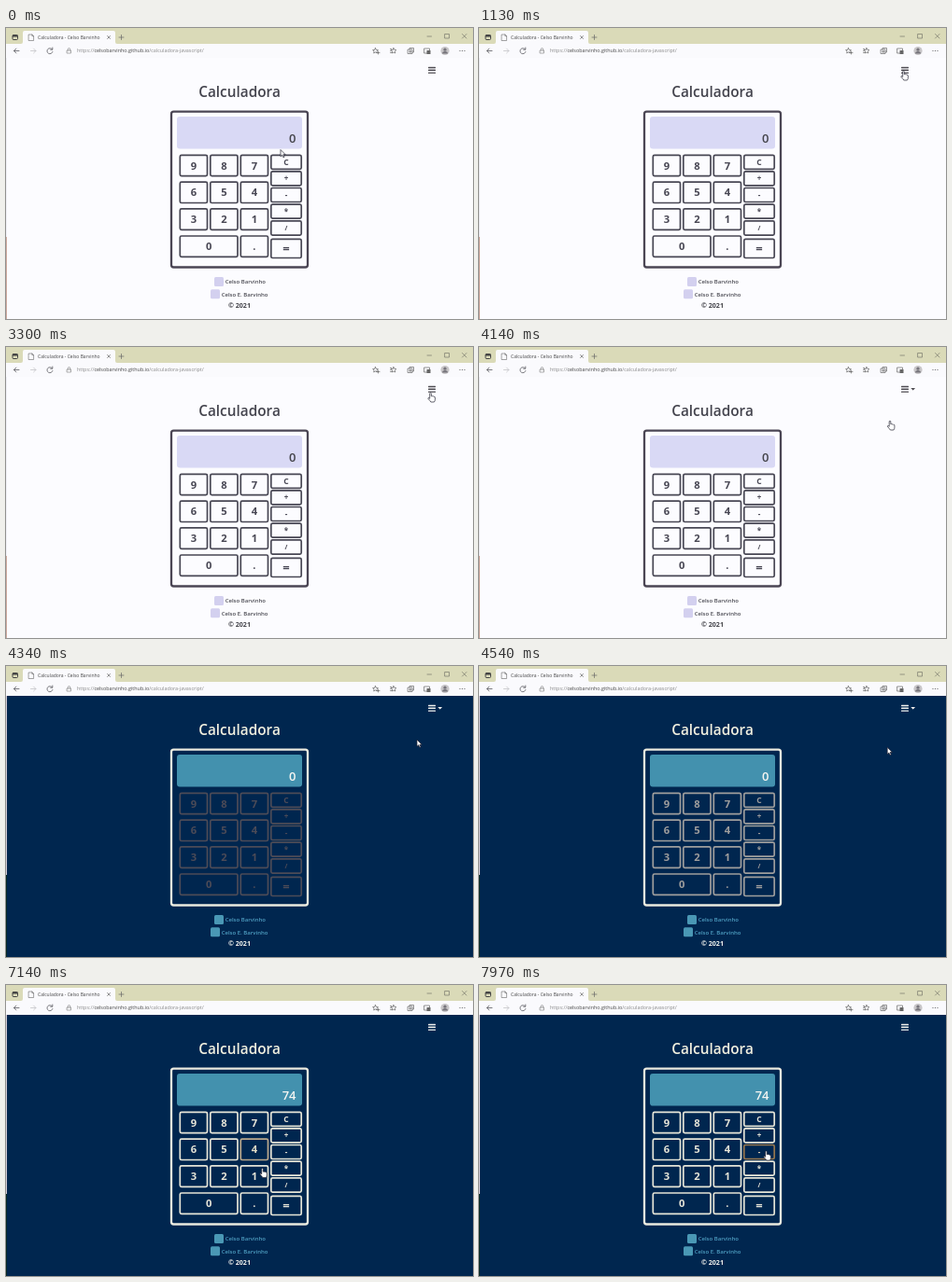
Recreate the animation shown at these times as an HTML page. Size 500 px wide and 312 px high, loop 8000 ms.

```html
<!DOCTYPE html>
<html lang="pt">
<head>
<meta charset="utf-8">
<title>Calculadora</title>
<style>
  html, body { margin: 0; width: 100%; height: 100%; overflow: hidden; }
  svg { display: block; width: 500px; height: 312px; }
  text { font-family: "Open Sans", "Noto Sans", sans-serif; }
</style>
</head>
<body>
<svg id="stage" viewBox="0 0 500 312" xmlns="http://www.w3.org/2000/svg"></svg>
<script>
const LOOP = 8000, THEME_AT = 4250;
const stage = document.getElementById('stage');

function add(tag, attrs, content) {
  const el = document.createElementNS(stage.namespaceURI, tag);
  for (const name in attrs) el.setAttribute(name, attrs[name]);
  if (content) el.textContent = content;
  return stage.appendChild(el);
}
const rect = (x, y, width, height, attrs) => add('rect', { x, y, width, height, ...attrs });
const label = (x, y, size, content, attrs) => add('text', { x, y, 'font-size': size, ...attrs }, content);
const line = (d, stroke = '#5c5c62', width = 0.8) =>
  add('path', { d, stroke, 'stroke-width': width, fill: 'none', 'stroke-linecap': 'round', 'stroke-linejoin': 'round' });

const clamp = v => Math.min(1, Math.max(0, v));
const ease = v => { v = clamp(v); return v * v * (3 - 2 * v); };
const mix = (a, b, p) => `rgb(${a.map((v, i) => Math.round(v + (b[i] - v) * p))})`;

// Elements whose colour depends on the theme
const themed = [];
function theme(el, light, dark, prop = 'fill') {
  themed.push({ el, prop, colors: [light, dark] });
  return el;
}

function drawBrowser() {
  rect(0, 0, 500, 18, { fill: '#dadab8' });
  add('path', { d: 'M16 17q2 0 2-2V5q0-2 2-2h95q2 0 2 2v10q0 2 2 2z', fill: '#fafafd' });
  rect(0, 17, 500, 16, { fill: '#fafafd' });
  rect(7, 7.5, 5.5, 5, { rx: 1, fill: 'none', stroke: '#444' });
  rect(7, 7.5, 5.5, 2, { fill: '#444' });
  line('M24.5 7h3.4l1.7 1.7v4.8h-5.1zM27.9 7v1.7h1.7', '#666', 0.6);
  label(34, 12, 5, 'Calculadora - Celso Barvinho', { fill: '#444' });
  line('M108.5 8.5l3 3m0-3l-3 3M121 10h5m-2.5-2.5v5', '#666', 0.7);
  line('M451 9h4.5M470 6.5h4.5v4.5h-4.5zM488.5 6.5l4.5 4.5m0-4.5l-4.5 4.5', '#77776a', 0.7);

  line('M14 24.5h-5.5m2.4-2.4l-2.4 2.4l2.4 2.4');
  line('M26.5 24.5h5.5m-2.4-2.4l2.4 2.4l-2.4 2.4', '#c4c4c8');
  line('M49.5 23a3 3 0 1 0 .4 2.5M49.8 21v2.2h-2.2');
  line('M65.5 24h4v3h-4zM66.3 24v-1.2a1.2 1.2 0 0 1 2.4 0v1.2', '#777', 0.6);
  const url = label(76, 26.3, 5.4, '', {});
  [['https://', '#888'], ['celsobarvinho.github.io', '#444'], ['/calculadora-javascript/', '#888']]
    .forEach(([part, fill]) => url.appendChild(add('tspan', { fill }, part)));

  const star = x => line(`M${x} 21.5l.9 1.9l2 .2l-1.5 1.4l.4 2l-1.8-1l-1.8 1l.4-2l-1.5-1.4l2-.2z`, '#666', 0.7);
  star(395.5);
  line('M397 26.500h3m-1.5-1.5v3', '#666', 0.7);
  star(415);
  line('M411.5 22.5h1.3m-1.3 2h.9m-.9 2h1.3', '#666', 0.7);
  line('M430.5 23h4.5v4.5h-4.5zM432 23v-1.5h4.500v4.5h-1.5M432.8 24v2.5m-1.2-1.2h2.5', '#666', 0.7);
  line('M448 22h5.5v5h-5.5z', '#666', 0.7);
  rect(450.5, 24, 4, 4, { fill: '#666' });
  add('circle', { cx: 470, cy: 24.5, r: 4.6, fill: '#c8c6c8' });
  add('circle', { cx: 470, cy: 23.2, r: 1.6, fill: '#77757c' });
  add('path', { d: 'M467 27.5a3 2.6 0 0 1 6 0z', fill: '#77757c' });
  for (const x of [486, 488.5, 491]) add('circle', { cx: x, cy: 24.5, r: 0.6, fill: '#555' });
}

const keys = {};
function addKey(name, x, y, w, h, size) {
  const box = rect(x, y, w, h, { rx: 1.6, fill: 'none', 'stroke-width': 1.7 });
  const text = label(x + w / 2, y + h / 2 + size * 0.36, size, name,
    { 'text-anchor': 'middle', 'font-weight': 700 });
  keys[name] = { box, text };
}

let caret, display;
function drawPage() {
  theme(rect(0, 32, 500, 280), '#fcfcff', '#00264f');
  theme(rect(0, 32, 1, 192), '#eeeef4', '#d5cdd6');
  theme(rect(0, 224, 1, 88), '#cba69c', '#0a2a24');

  for (let i = 0; i < 3; i++) theme(rect(452, 41.8 + i * 2.8, 8, 1.4, { rx: 0.4 }), '#4c4a50', '#f0f0ee');
  caret = theme(add('path', { d: 'M462.3 44h4.8l-2.4 2.6z' }), '#4c4a50', '#f0f0ee');

  const centered = { 'text-anchor': 'middle' };
  theme(label(250, 74, 15.35, 'Calculadora', { ...centered, 'font-weight': 600 }), '#44444e', '#f0efdf');
  theme(rect(177, 89.7, 146, 166.8, { rx: 2.5, fill: 'none', 'stroke-width': 2.3 }), '#4b4654', '#ebeadf', 'stroke');
  theme(rect(183, 95, 134, 34.5, { rx: 3 }), '#d9d9f5', '#4391ae');
  display = theme(label(310.5, 123, 13, '0', { 'text-anchor': 'end', 'font-weight': 600 }), '#44444a', '#f6f6f2');

  for (let i = 0; i < 9; i++)
    addKey(String(9 - i), 186.3 + (i % 3) * 32.5, 136.3 + Math.floor(i / 3) * 28.8, 29.2, 22.4, 11.2);
  addKey('0', 186.3, 223, 61.7, 22.4, 11.2);
  addKey('.', 251.3, 223, 29.2, 22.4, 11.2);
  const side = [['C', 136.3, 15, 8.5], ['+', 153.8, 15, 8], ['-', 171.5, 15, 8],
    ['*', 189.2, 15, 8], ['/', 206.8, 15.4, 7], ['=', 226.3, 20.2, 13]];
  for (const [name, y, h, size] of side) addKey(name, 283.8, y, 32.4, h, size);

  const links = [[223, 267, 'Celso Barvinho'], [219, 280.2, 'Celso E. Barvinho']];
  for (const [x, y, name] of links) {
    theme(rect(x, y, 10, 10, { rx: 1.5 }), '#d3d0ef', '#4a98b5');
    theme(label(x + 11.7, y + 7.4, 6, name, { 'font-weight': 600 }), '#4a4a52', '#4f9fc2');
  }
  theme(label(250, 300, 7.1, '© 2021', { ...centered, 'font-weight': 700 }), '#44444a', '#f4f4f0');
}

drawBrowser();
drawPage();

const pointerStyle = { fill: '#fff', stroke: '#222230', 'stroke-width': 0.7, 'stroke-linejoin': 'round' };
const arrow = add('path', { ...pointerStyle, d: 'M0 0v7.2l1.7-1.5l1.2 2.6l1.2-.6l-1.2-2.5h2.3z' });
const hand = add('path', { ...pointerStyle,
  d: 'M-.8 .7q.8-1.4 1.6 0v3q1-.6 1.5 .2q1-.5 1.4 .4q1.2-.3 1.2 .9v2.2q0 1.4-1 2.6h-3.5q-.9-1.400-2.9-3.5q-.4-1.3 .9-.9l.8 .7z' });

// Pointer stops: time, x, y
const path = [
  [0, 294, 130.5], [330, 294, 130.5], [1030, 454.5, 46], [2700, 454.5, 46], [3000, 454.5, 49],
  [3550, 454.5, 49], [4080, 440, 79], [4450, 440, 79], [4980, 404, 185], [5500, 317, 146.5],
  [5600, 317, 146.5], [5840, 268, 151], [6480, 268, 151], [6730, 267, 178], [6950, 268, 178],
  [7140, 274.5, 196.5], [7200, 274.5, 196.5], [7420, 279, 221], [7800, 307.5, 178], [8000, 307.5, 178]
];
const handTimes = [[960, 3720], [4000, 4270], [5470, LOOP]];

// Keys under the pointer: name, enter, leave
const hovers = [['C', 5570, 5680], ['7', 5760, 6570], ['4', 6650, 7020],
  ['1', 7130, 7290], ['-', 7680, 8400]];
const INK = [72, 71, 84], PALE = [230, 229, 216], HOVER = [150, 118, 78], TAN = [222, 212, 184];

function pointerAt(t) {
  const i = path.findIndex(stop => stop[0] > t);
  const [t0, x0, y0] = path[i - 1], [t1, x1, y1] = path[i];
  const p = ease((t - t0) / (t1 - t0));
  return [x0 + (x1 - x0) * p, y0 + (y1 - y0) * p];
}

function paintKeys(t) {
  const shift = ease((t - THEME_AT - 50) / 450);
  const base = mix(INK, PALE, shift);
  for (const { box, text } of Object.values(keys)) {
    box.setAttribute('stroke', base);
    text.setAttribute('fill', base);
  }
  for (const [name, enter, leave] of hovers) {
    const p = ease((t - enter) / 200) * (1 - ease((t - leave) / 260));
    if (!p) continue;
    keys[name].box.setAttribute('stroke', mix(PALE, HOVER, p));
    keys[name].text.setAttribute('fill', mix(PALE, TAN, p));
  }
}

function render(t) {
  const dark = t >= THEME_AT ? 1 : 0;
  for (const { el, prop, colors } of themed) el.setAttribute(prop, colors[dark]);
  paintKeys(t);
  display.textContent = t < 6400 ? '0' : t < 6860 ? '7' : '74';
  caret.setAttribute('visibility', t > 3600 && t < 4800 ? 'visible' : 'hidden');

  const isHand = handTimes.some(([from, to]) => t >= from && t < to);
  const place = `translate(${pointerAt(t)})`;
  for (const [el, shown] of [[arrow, !isHand], [hand, isHand]]) {
    el.setAttribute('transform', place);
    el.setAttribute('visibility', shown ? 'visible' : 'hidden');
  }
}

const start = performance.now();
function tick() {
  render(Math.max(0, performance.now() - start) % LOOP);
  requestAnimationFrame(tick);
}
tick();
</script>
</body>
</html>
```
